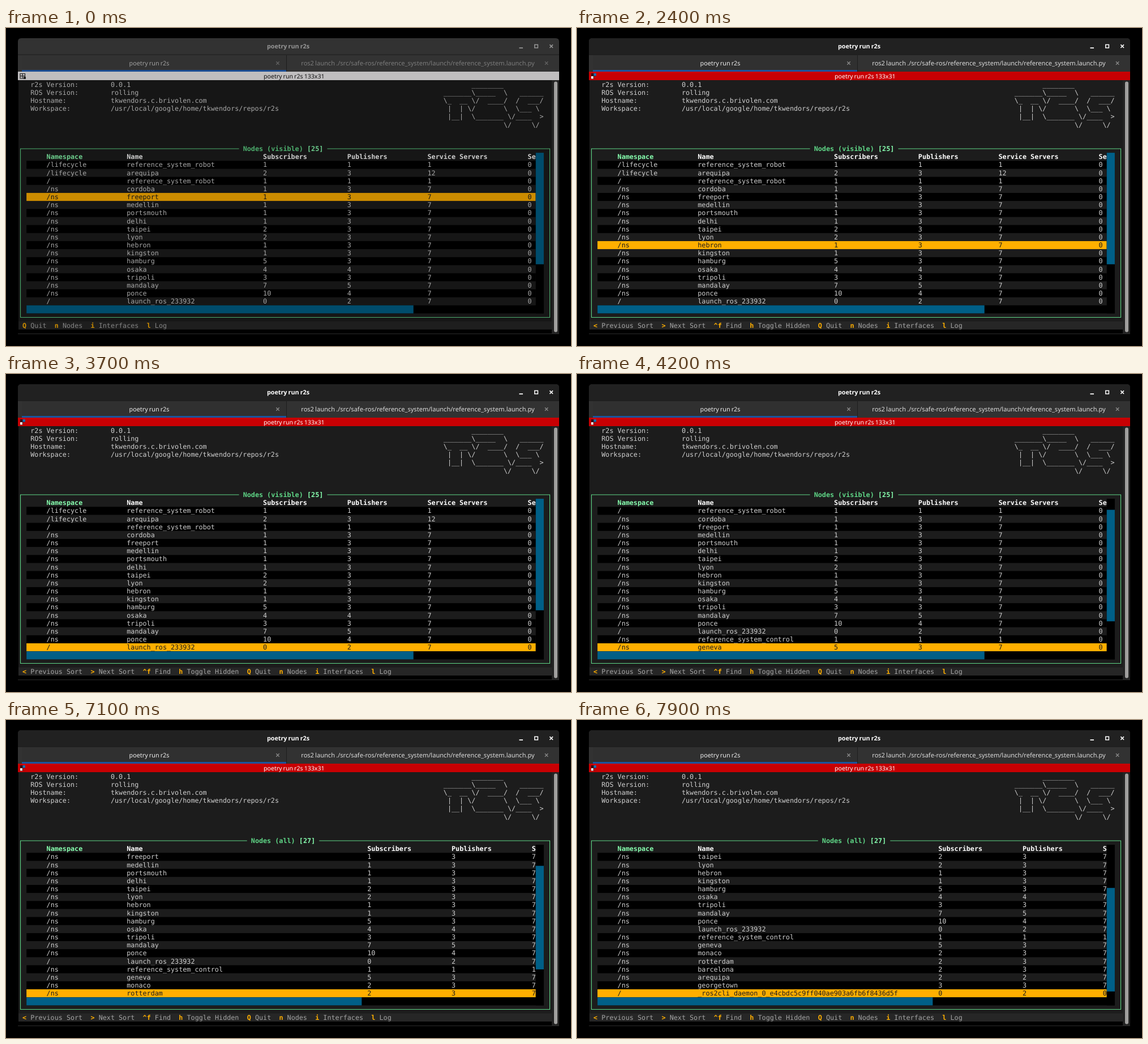
An HTML page that plays this animation: 998x561 px, repeating every 8 s.

```html
<!DOCTYPE html>
<html lang="en">
<head>
<meta charset="utf-8">
<title>Terminal node list</title>
<style>
  html, body { margin: 0; width: 100%; height: 100%; overflow: hidden; background: #000; }
  svg { display: block; width: 998px; height: 561px; }
  text { white-space: pre; text-rendering: geometricPrecision; }
  .term text { font: 11.765px "DejaVu Sans Mono", monospace; fill: #d0d0d0; }
  .term .b { font-weight: bold; }
  .ui text { font-family: "Noto Sans", sans-serif; text-anchor: middle; word-spacing: -.7px; }
</style>
</head>
<body>
<svg viewBox="0 0 998 561">
  <rect width="998" height="561"/>
  <g class="ui" id="idle"></g>
  <g class="ui" id="active"></g>
  <g class="term">
    <rect x="21" y="92" width="944" height="447"/>
    <rect x="22" y="92" width="942" height="440" fill="#1c1c1c"/>
    <g id="info"></g>
    <g id="table"></g>
    <g id="footer"></g>
  </g>
  <rect id="shade" x="21" y="92" width="943" height="441"/>
  <rect x="964" y="92" width="13" height="447" fill="#232323"/>
  <rect x="968" y="94.5" width="6" height="442" rx="3" fill="#a09f9e"/>
  <path d="M21 539.5H977" stroke="#2b2b2b"/>
</svg>
<script>
const LOOP = 8000, CW = 7.0833, RH = 2 * CW, VIEW = 18;
const $ = id => document.getElementById(id);
const X = col => 22 + col * CW;
const Y = row => 92.6 + row * RH;
const esc = s => String(s).replace(/&/g, '&amp;').replace(/</g, '&lt;');

const rect = (x, y, w, h, fill) =>
  `<rect x="${x}" y="${y}" width="${w}" height="${h}" fill="${fill}"/>`;
const cells = (col, row, w, h, fill) => rect(X(col), Y(row), w * CW, h * RH, fill);
const put = (col, row, s, fill = '#d0d0d0', bold) =>
  `<text x="${X(col)}" y="${Y(row) + 11.2}" style="fill:${fill}"${bold ? ' class="b"' : ''}>${esc(s)}</text>`;
const label = (x, y, size, fill, s, weight = 400) =>
  `<text x="${x}" y="${y}" font-size="${size}" font-weight="${weight}" fill="${fill}">${s}</text>`;
const cross = (x, y, r, color, w) =>
  `<path d="M${x - r} ${y - r}l${2 * r} ${2 * r}m0 ${-2 * r}l${-2 * r} ${2 * r}" stroke="${color}" stroke-width="${w}"/>`;

// Window frame, tabs and pane title
function chrome(c) {
  return `<path d="M21 92V24q0-6 6-6H971q6 0 6 6V92z" fill="${c.bar}"/>` +
    rect(21, 46.7, 956, 1, '#191919') +
    rect(21, 47.7, 956, 30, c.tabs) + rect(28, 48, 467, 29, c.tab) +
    rect(495, 48, 1, 29, '#1d1d1d') + rect(28, 74, 467, 3, c.line) +
    label(498.5, 36, 10.75, c.title, 'poetry run r2s', 700) +
    `<path d="M906.5 35.2h6.5" stroke="${c.title}" stroke-width="1.8"/>` +
    `<rect x="933.8" y="29.4" width="5.6" height="5.6" fill="none" stroke="${c.title}" stroke-width="1.5"/>` +
    cross(963.2, 32.2, 2.8, c.title, 1.7) +
    label(253, 66, 10.8, c.text, 'poetry run r2s') +
    label(727.5, 66, 11.07, c.text2, 'ros2 launch ./src/safe-ros/reference_system/launch/reference_system.launch.py') +
    cross(480, 62, 2.7, c.close, 1.3) + cross(954.7, 62, 2.7, c.close, 1.3) +
    rect(21, 77, 956, 15, c.pane) +
    label(508.8, 88.6, 10.6, c.paneText, 'poetry run r2s 133x31') + c.icon;
}

$('idle').innerHTML = chrome({
  bar: '#323232', tabs: '#333', tab: '#323232', line: '#1a4d94',
  title: '#969696', text: '#a0a0a0', text2: '#7c7c7c', close: '#626262',
  pane: '#c0bebf', paneText: '#111',
  icon: '<path d="M25 80.5h8.5v8.5h-8.5zM29.2 80.5v8.5M25 84.7h8.5" fill="none" stroke="#222" stroke-width="1.2"/>' +
        rect(31, 86, 4, 4, '#222')
});
$('active').innerHTML = chrome({
  bar: '#212121', tabs: '#323232', tab: '#303030', line: '#1c559f',
  title: '#fff', text: '#eee', text2: '#dcdcdc', close: '#8a8a8a',
  pane: '#c80003', paneText: '#fff',
  icon: rect(25, 80, 9, 9.5, '#3a0b10') + rect(29.5, 80, 4.5, 4.5, '#1c6fb0') +
        rect(25, 85, 4, 4.5, '#eee') + rect(30, 85, 4, 4.5, '#c80003')
});

const LOGO = String.raw`       ________
_______\_____  \   ______
\_  __ \/  ____/  /  ___/
 |  | \/       \  \___ \
 |__|  \_______ \/____  >
               \/     \/`.split('\n');
const INFO = [
  ['r2s Version:', '0.0.1'],
  ['ROS Version:', 'rolling'],
  ['Hostname:', 'tkwendors.c.brivolen.com'],
  ['Workspace:', '/usr/local/google/home/tkwendors/repos/r2s']
];
$('info').innerHTML =
  INFO.map(([k, v], i) => put(3, i, k) + put(23, i, v)).join('') +
  LOGO.map((s, i) => put(106, i, s)).join('');

// name, subscribers, publishers, service servers, namespace
const NODES = `reference_system_robot 1 1 1 /lifecycle
arequipa 2 3 12 /lifecycle
reference_system_robot 1 1 1 /
cordoba
freeport
medellin
portsmouth
delhi
taipei 2
lyon 2
hebron
kingston
hamburg 5
osaka 4 4
tripoli 3
mandalay 7 5
ponce 10 4
launch_ros_233932 0 2 7 /
reference_system_control 1 1 1
geneva 5
monaco 2
rotterdam 2
barcelona 2
arequipa 2 2
georgetown 3
_ros2cli_daemon_0_e4cbdc5c9ff040ae903a6fb6f8436d5f 0 2 0 /`.split('\n').map(line => {
  const [name, subs = 1, pubs = 3, srv = 7, ns = '/ns'] = line.split(' ');
  return [ns, name, subs, pubs, srv, 0];
});
const HEAD = ['Namespace', 'Name', 'Subscribers', 'Publishers', 'Service Servers', 'Service Clients'];
const LAYOUTS = {
  visible: { cols: [7, 27, 61, 82, 102, 127], count: 25, bar: 96.5 },
  all: { cols: [7, 27, 87, 108, 128], count: 27, bar: 83.6 }
};

function line(cols, values, row, color, bold) {
  return cols.map((c, i) =>
    put(c, row, String(values[i]).slice(0, 129 - c), color(i), bold)).join('');
}

function table(mode, cursor) {
  const { cols, count, bar } = LAYOUTS[mode];
  const top = Math.max(0, cursor - VIEW + 1);
  const title = `Nodes (${mode})`, size = title.length + 5;
  const at = Math.floor((133 - size) / 2);
  let out = `<path d="M${X(at - 1)} ${Y(8.5)}H${X(.5)}V${Y(29.5)}H${X(132.5)}V${Y(8.5)}H${X(at + size + 1)}"
    fill="none" stroke="#5fd787" stroke-width="1.1"/>` +
    put(at, 8, title, '#5fd787', true) + put(at + size - 4, 8, `[${count}]`, '#87ffaf', true) +
    line(cols, HEAD, 9, i => i ? '#fff' : '#87ffaf', true);
  for (let i = 0; i < VIEW; i++) {
    const n = top + i, row = 10 + i, on = n === cursor;
    if (on || n % 2 === 0) out += cells(2, row, 127, 1, on ? '#ffaf00' : '#000');
    out += line(cols, NODES[n], row, () => on ? '#1c1c1c' : '#d0d0d0');
  }
  // Scroll bars move in eighths of a cell
  const unit = 19 / (count + 1);
  return out + cells(129, 9, 2, 20, '#000') + cells(2, 28, 129, 1, '#000') +
    cells(129, 9 + Math.floor(top * unit * 8) / 8, 2, 19 * unit, '#005f87') +
    cells(2, 28, bar, 1, '#005f87');
}

const TABLE_KEYS = [['<', 'Previous Sort'], ['>', 'Next Sort'], ['^f', 'Find'], ['h', 'Toggle Hidden']];
const APP_KEYS = [['Q', 'Quit'], ['n', 'Nodes'], ['i', 'Interfaces'], ['l', 'Log']];

function footer(focused) {
  let col = 1, out = cells(0, 30, 133, 1, '#262626');
  for (const [key, name] of focused ? [...TABLE_KEYS, ...APP_KEYS] : APP_KEYS) {
    out += put(col, 30, key, '#ffaf00', true) + put(col + key.length + 1, 30, name, '#a4a4a4');
    col += key.length + name.length + 3;
  }
  return out;
}

// Rows stepped through by a held key
const steps = (t, start, every, max) =>
  Math.max(0, Math.min(max, 1 + Math.floor((t - start) / every)));

let shown = '';
function draw() {
  const t = performance.now() % LOOP;
  const p = Math.max(0, Math.min(1, (t - 560) / 200));
  const glow = 1 - (1 - p) ** 2;
  $('active').style.opacity = glow;
  $('shade').style.opacity = .2 * (1 - glow);

  const cursor = 4 + steps(t, 1420, 176, 15) + steps(t, 6750, 200, 6);
  const mode = t < 5100 ? 'visible' : 'all';
  const focused = t >= 900;
  const state = [cursor, mode, focused].join();
  if (state !== shown) {
    shown = state;
    $('table').innerHTML = table(mode, cursor);
    $('footer').innerHTML = footer(focused);
  }
  requestAnimationFrame(draw);
}
draw();
</script>
</body>
</html>
```
